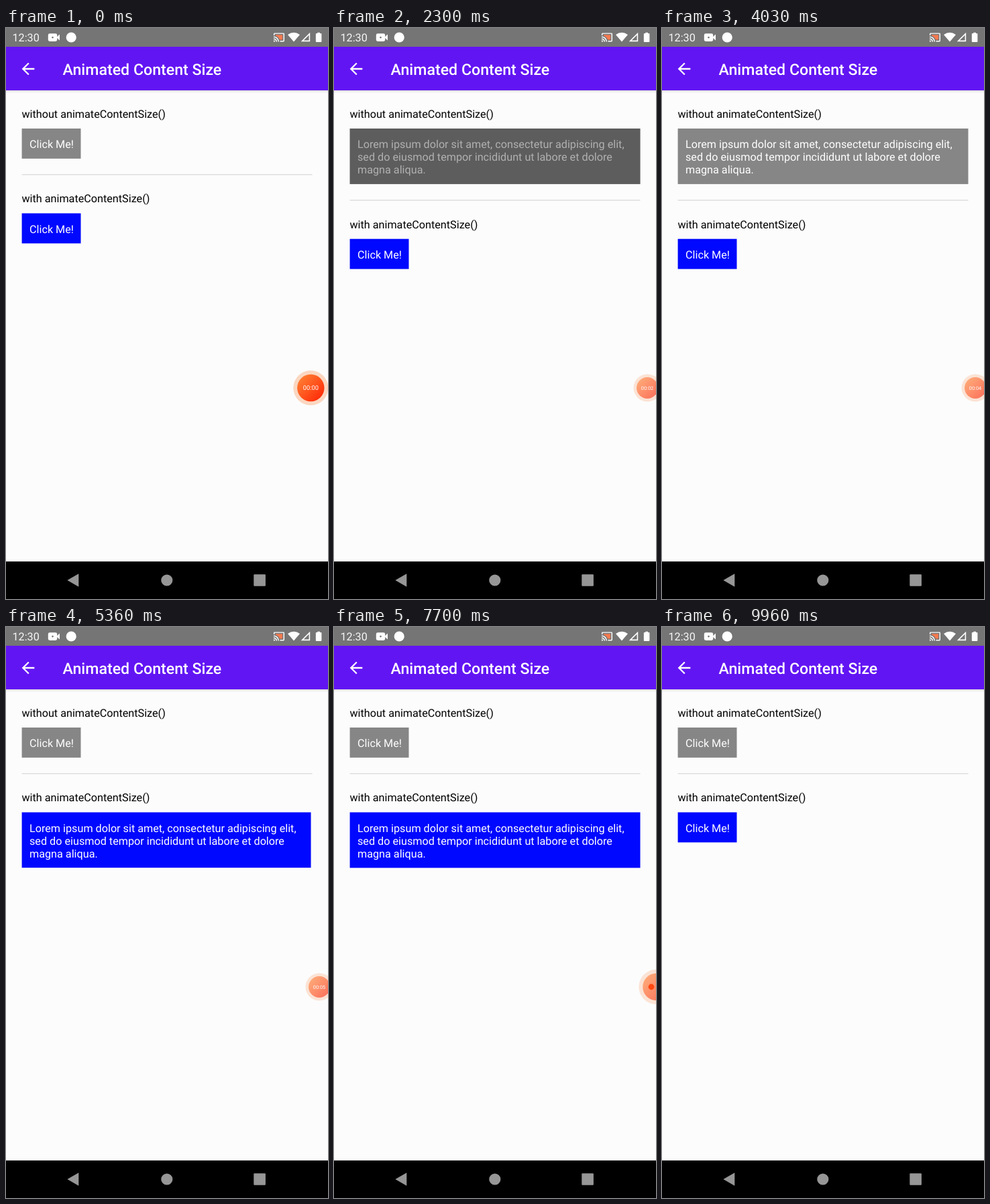
Animation of 480 by 852 pixels, one loop 10000 ms. Source, as an HTML page:

```html
<!DOCTYPE html>
<html lang="en">
<head>
<meta charset="utf-8">
<title>Animated Content Size</title>
<style>
html, body { margin: 0; width: 100%; height: 100%; overflow: hidden; background: #fcfcfc; }
svg { display: block; width: 100%; height: 100%; font: 16.2px Roboto, sans-serif; text-rendering: geometricPrecision; }
</style>
</head>
<body>
<svg viewBox="0 0 480 852">
  <defs>
    <linearGradient id="ball" x1="0.1" y1="0.1" x2="0.9" y2="0.9">
      <stop offset="0" stop-color="#ff7f33"/>
      <stop offset="1" stop-color="#ff2a08"/>
    </linearGradient>
    <linearGradient id="shade" x1="0" y1="0" x2="0" y2="1">
      <stop offset="0" stop-color="#000" stop-opacity=".12"/>
      <stop offset="1" stop-color="#000" stop-opacity="0"/>
    </linearGradient>
    <clipPath id="greyClip"><rect class="grey" x="23.6"/></clipPath>
    <clipPath id="blueClip"><rect class="blue" x="23.6"/></clipPath>
  </defs>
  <rect width="480" height="852" fill="#fcfcfc"/>

  <!-- status bar -->
  <rect width="480" height="28" fill="#757575"/>
  <g fill="#fff">
    <text x="9.5" y="20.2" fill="#f6f6f6">12:30</text>
    <rect x="62.8" y="8.3" width="13.4" height="11.6" rx="2.4"/>
    <path d="M75 14L80 9.6V18.6z"/>
    <circle cx="69.5" cy="14.1" r="1.3" fill="#757575"/>
    <circle cx="97.2" cy="14" r="7.6"/>
    <g transform="translate(398.2 5.2) scale(.73)">
      <path fill="#f47a50" d="M19 7H5v1.63c3.96 1.28 7.09 4.41 8.37 8.37H19z"/>
      <path d="M1 18v3h3c0-1.66-1.34-3-3-3zm0-4v2c2.76 0 5 2.24 5 5h2c0-3.87-3.13-7-7-7zm0-4v2c4.97 0 9 4.03 9 9h2c0-6.08-4.93-11-11-11zm20-7H3c-1.1 0-2 .9-2 2v3h2V5h18v14h-7v2h7c1.1 0 2-.9 2-2V5c0-1.1-.9-2-2-2z"/>
    </g>
    <path d="M429 20.5L420 10Q429 3.5 438 10z"/>
    <path d="M452.4 8.6V19.4H441.6z" fill="none" stroke="#fff" stroke-width="1.6"/>
    <path d="M464.3 8V6.8h3.6V8h1.6q.9 0 .9.9v11.2q0 .9-.9.9h-6.8q-.9 0-.9-.9V8.9q0-.9.9-.9z"/>
  </g>

  <!-- app bar -->
  <rect y="93" width="480" height="4" fill="url(#shade)"/>
  <rect y="28" width="480" height="65" fill="#6215f3"/>
  <path transform="translate(19 47) scale(1.1667)" fill="#fff" d="M20 11H7.83l5.59-5.59L12 4l-8 8 8 8 1.41-1.41L7.83 13H20z"/>
  <text x="84.6" y="69.8" fill="#fff" font-size="23.15" font-weight="500">Animated Content Size</text>

  <!-- content -->
  <text x="23.4" y="134">without animateContentSize()</text>
  <g transform="translate(0 150)">
    <rect class="grey" x="23.6" fill="#868686"/>
    <g id="greyText" clip-path="url(#greyClip)" fill="#fff"></g>
    <rect class="grey" id="greyPress" x="23.6"/>
  </g>
  <g id="lower">
    <rect x="23.6" y="218.2" width="432.9" height="1.2" fill="#d8d8d8"/>
    <text x="23.4" y="260.4">with animateContentSize()</text>
    <g transform="translate(0 276.5)">
      <rect class="blue" x="23.6" fill="#0008ff"/>
      <g id="blueText" clip-path="url(#blueClip)" fill="#fff"></g>
      <rect class="blue" id="bluePress" x="23.6"/>
    </g>
  </g>

  <!-- floating timer -->
  <g id="timer">
    <g id="face">
      <circle r="26" fill="#fbd7c1"/>
      <circle r="20.2" fill="url(#ball)"/>
      <text id="clock" y="3.4" fill="#fff" font-size="9.3" text-anchor="middle"></text>
    </g>
    <circle id="dot" cx="-7.4" r="4.4" fill="#ff4810"/>
  </g>

  <!-- navigation bar -->
  <rect y="796" width="480" height="56" fill="#000"/>
  <g fill="#969696">
    <path d="M91.4 824L108.3 814.2V833.8z"/>
    <circle cx="239.8" cy="824" r="8.6"/>
    <rect x="369.3" y="815.2" width="17.6" height="17.6" rx="1"/>
  </g>
</svg>
<script>
const LOOP = 10000;
const SMALL = [87.9, 44.9], LARGE = [432.9, 82.9];
const SHORT = ["Click Me!"];
const LONG = ["Lorem ipsum dolor sit amet, consectetur adipiscing elit,",
  "sed do eiusmod tempor incididunt ut labore et dolore", "magna aliqua."];
const greyTaps = [1330, 2340, 3250, 4200];
const blueTaps = [4997, 6005, 7000, 8000];

const $ = id => document.getElementById(id);
const clamp = v => Math.min(1, Math.max(0, v));
const ramp = (t, a, b) => clamp((t - a) / (b - a));
const ease = p => p * p * (3 - 2 * p);
const mix = (a, b, p) => a + (b - a) * p;

// critically damped spring, stiffness 400
const spring = ms => 1 - (1 + ms / 50) * Math.exp(-ms / 50);

const isOpen = (t, taps) => taps.filter(tap => t >= tap).length % 2 === 1;

function springOpen(t, taps) {
  const last = taps.filter(tap => t >= tap).pop();
  if (last === undefined) return 0;
  const p = spring(t - last);
  return isOpen(t, taps) ? p : 1 - p;
}

const pressed = (t, taps) => Math.max(...taps.map(tap =>
  ramp(t, tap - 130, tap - 60) * (1 - ramp(t, tap + 20, tap + 170))));

function fill(id, lines) {
  $(id).innerHTML = lines.map((s, i) =>
    `<text x="35" y="${29 + i * 19.15}">${s}</text>`).join("");
}

function drawBox(name, t, taps, amount) {
  const w = mix(SMALL[0], LARGE[0], amount), h = mix(SMALL[1], LARGE[1], amount);
  document.querySelectorAll("." + name).forEach(r => {
    r.setAttribute("width", w);
    r.setAttribute("height", h);
  });
  fill(name + "Text", isOpen(t, taps) ? LONG : SHORT);
  $(name + "Press").setAttribute("opacity", 0.31 * pressed(t, taps));
}

function drawTimer(t) {
  const dock = ease(ramp(t, 1400, 1650)), wake = ease(ramp(t, 7080, 7200));
  const x = mix(mix(454.3, 467, dock), 480.4, wake);
  const size = mix(1, 0.79, dock * (1 - wake));
  $("timer").setAttribute("transform", `translate(${x} 537) scale(${size})`);
  $("timer").setAttribute("display", t < 9600 ? "inline" : "none");
  $("face").setAttribute("opacity", mix(1, 0.65, dock));
  $("clock").textContent = t < 7080 ? "00:0" + Math.floor(t / 1000) : "";
  $("dot").setAttribute("opacity", wake);
}

function draw(t) {
  const grey = isOpen(t, greyTaps) ? 1 : 0;
  drawBox("grey", t, greyTaps, grey);
  $("lower").setAttribute("transform", `translate(0 ${grey * 38.2})`);
  drawBox("blue", t, blueTaps, springOpen(t, blueTaps));
  drawTimer(t);
}

const start = performance.now();
function tick() {
  draw((performance.now() - start) % LOOP);
  requestAnimationFrame(tick);
}
tick();
</script>
</body>
</html>
```
